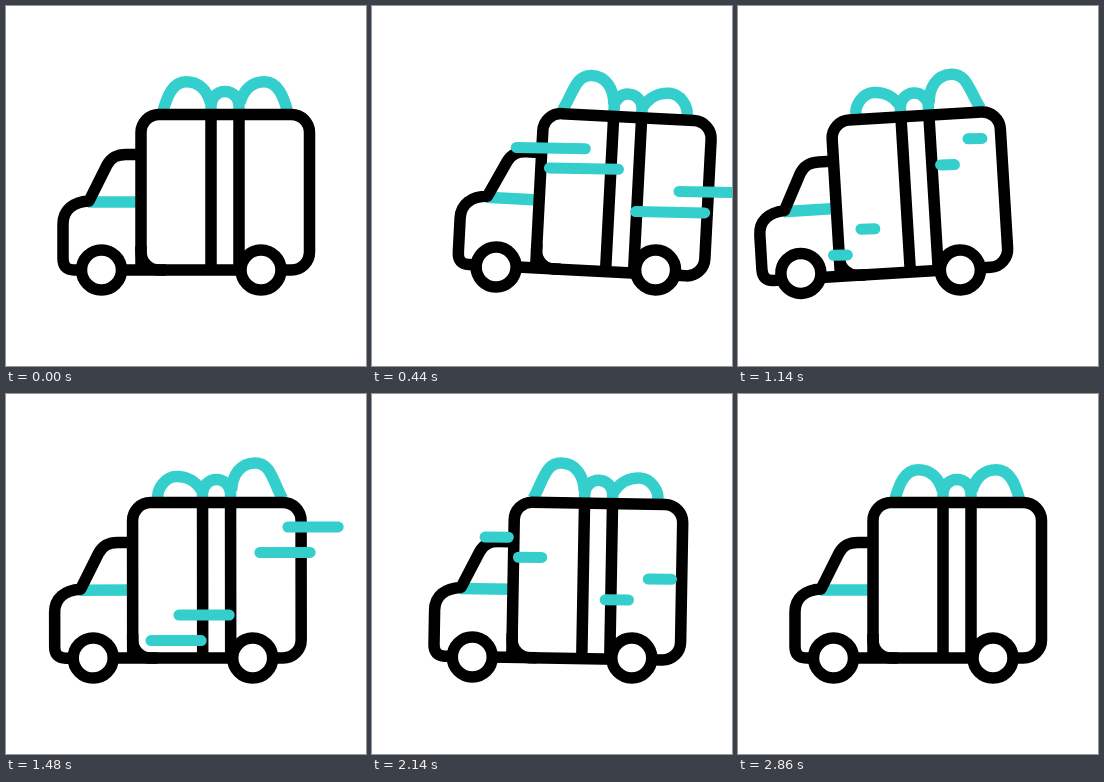
These frames come from a looping animation (360x360 px, 2900 ms). An HTML page:

```html
<!DOCTYPE html>
<html lang="en">
<head>
<meta charset="utf-8">
<title>Gift truck</title>
<style>
  html, body { margin: 0; width: 100%; height: 100%; overflow: hidden; background: #fff; }
  svg { display: block; width: 100vw; height: 100vh; }
  .ink, .teal { fill: none; stroke-width: 11.5; stroke-linejoin: round; }
  .ink { stroke: #000; }
  .teal { stroke: #34cfcd; }
  .wheel { fill: #fff; }
  #streaks { stroke-width: 11; stroke-linecap: round; }
</style>
</head>
<body>
<svg viewBox="0 0 360 360">
  <g id="truck">
    <g id="body">
      <g class="teal">
        <path id="lobeL"/>
        <path id="lobeR" transform="translate(438.5 0) scale(-1 1)"/>
        <path d="M205 106V99.5a14 14 0 0 1 28 0V106"/>
        <path d="M82 196H134"/>
      </g>
      <g class="ink">
        <path d="M78 264H68Q57 264 57 252.500V218C57 204 67 196 83 195L101 159C105.500 151 111 148.500 120 148.500H140"/>
        <rect x="135" y="108.500" width="168.500" height="155.500" rx="18"/>
        <path d="M112 264H160M135 240V264M205 108V264M233 108V264"/>
      </g>
    </g>
    <g class="ink wheel">
      <circle cx="95.500" cy="264" r="20"/>
      <circle cx="255" cy="264" r="20"/>
    </g>
    <path id="streaks" class="teal"/>
  </g>
</svg>
<script>
const LOOP = 2900;
const STREAK = 75;

const $ = id => document.getElementById(id);
const clamp = (v, low, high) => Math.min(high, Math.max(low, v));

// Eases through evenly spaced poses and rests on the last one.
function swing(poses, step, t) {
  const i = Math.floor(t / step);
  if (i >= poses.length - 1) return poses[poses.length - 1];
  const p = t / step - i;
  return poses[i] + (poses[i + 1] - poses[i]) * p * p * (3 - 2 * p);
}

const shift = t => swing([0, 34, -33.5, 15.4, 0], 590, t);
const tilt = t => swing([0, 1.15, -1.15, 1.05, 0], 590, t);
// The bow lags behind and holds at its extremes.
const sway = t => clamp(2 * swing([0, 1, -1, 1, 0], 680, t), -1, 1);

// Left half of the bow: tall and angular at s = 1, low and round at s = -1.
function lobe(s) {
  const base = 157 - 3.5 * s, top = 75.7 - 6.8 * s;
  return `M${base} 105C${base + 4 + 6 * s} ${91 - 4 * s} ${166.5 - 1.5 * s} ${top} ${180 + s} ${top}` +
    `C${193 + 2.5 * s} ${top} ${201 + 3 * s} ${84 - 3 * s} 204.5 97`;
}

const pair = (x, y, dx, dy) => [[x, y], [x + dx, y + dy]];
const back = [...pair(107.5, 144, 33.5, 20), ...pair(271, 185, -43, 21)];
const front = [...pair(265.5, 133, -28, 25.5), ...pair(156.5, 221, -28, 25.5)];

// Each line grows to the right, then is wiped away from the left.
function burst(t, start, span, lines) {
  const age = (t - start) / span;
  const from = STREAK * clamp(age - 1, 0, 1);
  const to = STREAK * clamp(age, 0, 1);
  if (to - from < 1) return '';
  return lines.map(([x, y]) => `M${x + from} ${y}H${x + to}`).join('');
}

function draw(t) {
  const k = tilt(t), s = sway(t);
  $('truck').setAttribute('transform', `translate(${shift(t)} 0) rotate(${1.1 * k} 255 264)`);
  $('body').setAttribute('transform', `translate(0 ${1.8 * Math.abs(k)}) rotate(${2 * k} 180 264)`);
  $('lobeL').setAttribute('d', lobe(s));
  $('lobeR').setAttribute('d', lobe(-s));
  $('streaks').setAttribute('d',
    burst(t, 20, 390, back) + burst(t, 1086, 297, front) + burst(t, 2020, 390, back));
}

const begin = performance.now();
function tick() {
  draw((performance.now() - begin) % LOOP);
  requestAnimationFrame(tick);
}
tick();
</script>
</body>
</html>
```
